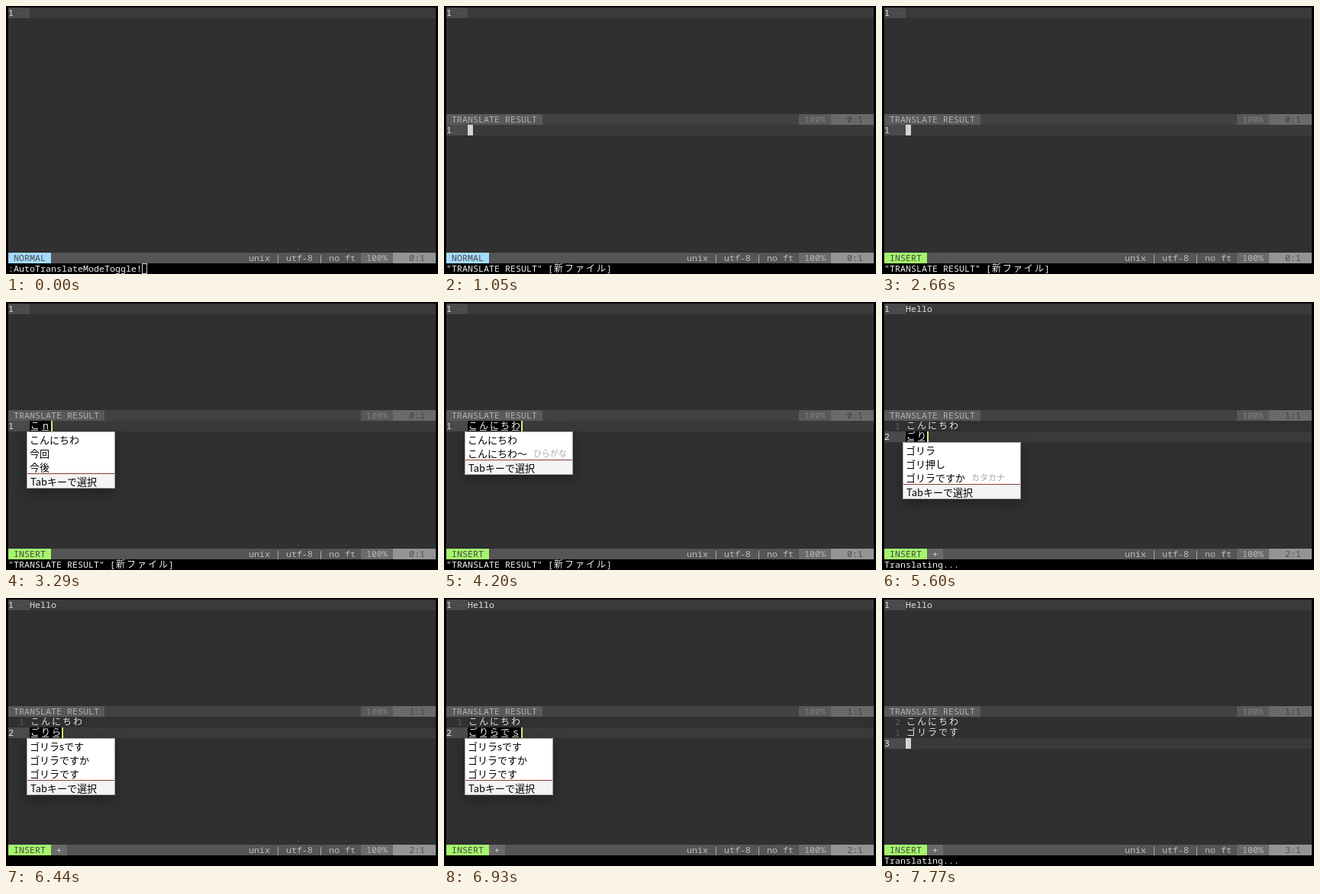
These frames come from a looping animation (566 by 352 pixels, 8000 ms). An HTML page with a canvas:

```html
<!DOCTYPE html>
<html lang="ja">
<head>
<meta charset="utf-8">
<title>Translating while typing</title>
<style>
  html, body { margin: 0; width: 100%; height: 100%; overflow: hidden; background: #000; }
  canvas { display: block; width: 566px; height: 352px; }
</style>
</head>
<body>
<canvas id="stage"></canvas>
<script>
const W = 566, H = 352, LOOP = 8000;
const CW = 7, RH = 14, LEFT = 3, TOP = 2, COLS = 80;
const SPLIT_ROW = 10, STATUS_ROW = 23, CMD_ROW = 24, GUTTER = 4;
const MONO = '11.67px "Noto Sans Mono", "DejaVu Sans Mono", monospace';
const WIDE = '12px "Noto Sans CJK JP", "Noto Sans CJK", sans-serif';
const MENU = '13px "Noto Sans CJK JP", "Noto Sans CJK", sans-serif';
const HINT = '11px "Noto Sans CJK JP", "Noto Sans CJK", sans-serif';

const canvas = document.getElementById('stage');
const ctx = canvas.getContext('2d');
const dpr = window.devicePixelRatio || 1;
canvas.width = W * dpr;
canvas.height = H * dpr;
ctx.scale(dpr, dpr);

const COMMAND = ':AutoTranslateModeToggle!';
const NEW_FILE = '"TRANSLATE RESULT" [新ファイル]';
const WAIT = 'Translating...';

const menu = (width, ...items) => ({ width, items });
const menuKo = menu(142, 'これ', 'この', 'こちらこそ|ひらがな');
const menuKon = menu(116, 'こんにちわ', '今回', '今後');
const menuKonni = menu(120, 'こんにちわ', 'こんにちは', 'こんにちわ〜');
const menuHello = menu(142, 'こんにちわ', 'こんにちわ〜|ひらがな');
const menuGo = menu(155, 'ご確認', 'ございます', 'ご覧ください|ひらがな');
const menuGoi = menu(116, 'ごい', 'ごいい', '語彙');
const menuGori = menu(155, 'ゴリラ', 'ゴリ押し', 'ゴリラですか|カタカナ');
const menuGorira = menu(116, 'ゴリラsです', 'ゴリラですか', 'ゴリラです');
const menuDe = menu(155, 'ゴリラでした', 'ゴリラですか', 'ゴリラでして|カタカナ');
const menuDesu = menu(132, 'ゴリラです', 'ごりらです|ひらがな');

const START = {
  split: false, focus: false, mode: 'NORMAL', cmd: COMMAND, lines: [''],
  typed: '', menu: null, pos: '0:1', result: '', resultPos: '0:1', edited: false
};

// Each step changes part of the editor state from its time on.
const STEPS = [
  [70, { focus: true }],
  [980, { split: true, cmd: '' }],
  [1050, { cmd: NEW_FILE }],
  [2660, { mode: 'INSERT' }],
  [3080, { typed: 'ｋ', menu: menuKo }],
  [3150, { typed: 'こ' }],
  [3290, { typed: 'こｎ', menu: menuKon }],
  [3500, { typed: 'こん' }],
  [3640, { typed: 'こんｎ' }],
  [3710, { typed: 'こんに', menu: menuKonni }],
  [3850, { typed: 'こんにｔ' }],
  [3920, { typed: 'こんにち' }],
  [4060, { typed: 'こんにちｗ' }],
  [4130, { typed: 'こんにちわ' }],
  [4200, { menu: menuHello }],
  [4270, { typed: '', menu: null, lines: ['こんにちわ'] }],
  [4340, { edited: true, pos: '1:11' }],
  [4410, { lines: ['こんにちわ', ''], pos: '2:1' }],
  [4480, { cmd: WAIT }],
  [4620, { typed: 'ｇ', menu: menuGo }],
  [4760, { typed: 'ご' }],
  [4970, { typed: 'ごい', menu: menuGoi }],
  [5040, { typed: 'ご', menu: menuGo }],
  [5110, { typed: 'ごｒ' }],
  [5180, { typed: 'ごり', menu: menuGori }],
  [5530, { result: 'Hello' }],
  [5600, { resultPos: '1:1' }],
  [5810, { cmd: '' }],
  [6230, { typed: 'ごりｒ' }],
  [6440, { typed: 'ごりら', menu: menuGorira }],
  [6580, { typed: 'ごりらｄ', menu: menuDe }],
  [6720, { typed: 'ごりらで' }],
  [6790, { menu: menuGorira }],
  [6930, { typed: 'ごりらでｓ' }],
  [7000, { typed: 'ごりらです', menu: menuDesu }],
  [7140, { typed: '', menu: null, lines: ['こんにちわ', 'ゴリラです'] }],
  [7210, { pos: '2:11' }],
  [7630, { lines: ['こんにちわ', 'ゴリラです', ''] }],
  [7700, { pos: '3:1' }],
  [7770, { cmd: WAIT }]
];

const stateAt = t =>
  STEPS.reduce((s, [at, change]) => at <= t ? Object.assign(s, change) : s, { ...START });

const isWide = ch => ch > '\u2fff';
const cells = text => [...text].reduce((n, ch) => n + (isWide(ch) ? 2 : 1), 0);
const colX = col => LEFT + col * CW;
const rowY = row => TOP + row * RH;

function fill(color, x, y, w, h) {
  ctx.fillStyle = color;
  ctx.fillRect(x, y, w, h);
}

function block(color, col, row, count) {
  fill(color, colX(col), rowY(row), count * CW, RH);
}

function print(text, col, row, color) {
  ctx.fillStyle = color;
  for (const ch of text) {
    const wide = isWide(ch);
    ctx.font = wide ? WIDE : MONO;
    ctx.fillText(ch, colX(col) + (wide ? 1 : 0), rowY(row) + 11);
    col += wide ? 2 : 1;
  }
}

function segment(text, col, row, bg, fg) {
  block(bg, col, row, text.length);
  print(text, col, row, fg);
}

// Current line shows its own number, the others their distance.
function pane(lines, first, end) {
  const current = lines.length - 1;
  for (let row = first; row < end; row++) {
    const i = row - first;
    if (i > current) {
      print('~', 0, row, '#3a3a3a');
      continue;
    }
    if (i === current) {
      block('#3a3a3a', 0, row, COLS);
      block('#4b4b4b', 0, row, GUTTER);
      print(String(i + 1), 0, row, '#e8e8e8');
    } else {
      print(String(current - i), 2, row, '#606060');
    }
    print(lines[i], GUTTER, row, '#e2e2e2');
  }
}

function ruler(row, pos, share, sharedInk, place, placeInk) {
  segment(' 100% ', 66, row, share, sharedInk);
  segment(('   ' + pos).padEnd(8), 72, row, place, placeInk);
}

function statusLines(s) {
  if (s.split) {
    block('#424242', 0, SPLIT_ROW, COLS);
    segment(' TRANSLATE RESULT ', 0, SPLIT_ROW, '#595959', '#b0b0b0');
    ruler(SPLIT_ROW, s.resultPos, '#585858', '#808080', '#6a6a6a', '#404040');
  }
  block('#555555', 0, STATUS_ROW, COLS);
  const modeColor = s.mode === 'INSERT' ? '#a5f56c' : '#a4dbff';
  segment(` ${s.mode} `, 0, STATUS_ROW, modeColor, '#484848');
  if (s.edited) segment(' + ', 8, STATUS_ROW, '#6a6a6a', '#d8d8d8');
  print('unix | utf-8 | no ft', 45, STATUS_ROW, '#bcbcbc');
  ruler(STATUS_ROW, s.pos, '#6a6a6a', '#b4b4b4', '#949494', '#505050');
}

function cursor(s, row) {
  if (!s.split) {
    const x = colX(cells(s.cmd)), y = rowY(CMD_ROW);
    if (s.focus) return fill('#d4d4d4', x, y, CW, RH);
    ctx.strokeStyle = '#d4d4d4';
    ctx.lineWidth = 1;
    ctx.strokeRect(x + 0.5, y + 0.5, CW - 1, RH - 1);
  } else if (!s.typed) {
    block('#d4d4d4', GUTTER + cells(s.lines[s.lines.length - 1]), row, 1);
  }
}

function composition(text, row) {
  const n = [...text].length, x = colX(GUTTER), y = rowY(row);
  fill('#000', x, y, n * 2 * CW, RH);
  print(text, GUTTER, row, '#f4f4f4');
  for (let i = 0; i < n; i++) fill('#d8d8d8', x + i * 14 + 2, y + 12, 9, 1);
  fill('#e9e27c', x + n * 14, y, 2, RH);
}

function menuText(text, x, y, font = MENU, color = '#000') {
  ctx.font = font;
  ctx.fillStyle = color;
  ctx.fillText(text, x, y);
}

function candidates({ width, items }, row) {
  const x = 27, y = rowY(row) + RH;
  const rule = y + 1 + items.length * 18, height = rule + 20 - y;
  ctx.save();
  ctx.shadowColor = 'rgba(0,0,0,.32)';
  ctx.shadowBlur = 16 * dpr;
  ctx.shadowOffsetY = 6 * dpr;
  fill('#a8a8a8', x, y, width, height);
  ctx.restore();
  fill('#fff', x + 1, y + 1, width - 2, height - 2);
  fill('#f4f4f4', x + 1, rule + 1, width - 2, 18);
  fill('#8c3a3a', x + 1, rule, width - 2, 1);
  items.forEach((item, i) => {
    const [word, hint] = item.split('|');
    const base = y + 16 + i * 18;
    menuText(word, x + 4, base);
    if (hint) menuText(hint, x + 4 + ctx.measureText(word).width + 8, base - 1, HINT, '#a8a8a8');
  });
  menuText('Tabキーで選択', x + 5, rule + 16);
}

function draw(t) {
  const s = stateAt(t);
  const first = s.split ? SPLIT_ROW + 1 : 0;
  const row = first + s.lines.length - 1;
  fill('#000', 0, 0, W, H);
  fill('#303030', LEFT, TOP, COLS * CW, STATUS_ROW * RH);
  if (s.split) pane([s.result], 0, SPLIT_ROW);
  pane(s.lines, first, STATUS_ROW);
  statusLines(s);
  print(s.cmd, 0, CMD_ROW, '#f0f0f0');
  cursor(s, row);
  if (s.menu) candidates(s.menu, row);
  if (s.typed) composition(s.typed, row);
}

const began = performance.now();
function tick() {
  draw((performance.now() - began) % LOOP);
  requestAnimationFrame(tick);
}
tick();
</script>
</body>
</html>
```
